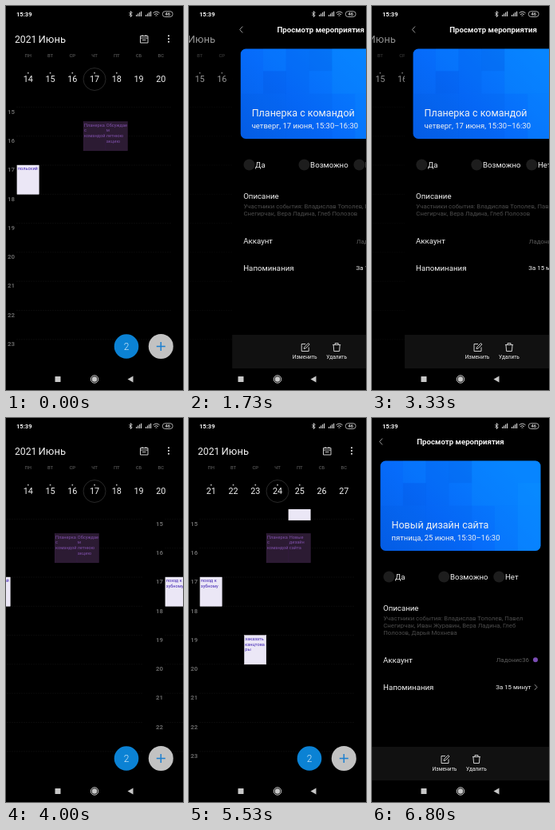
An HTML page for the animation above (7.67 s loop, 222 by 480 pixels).

```html
<!DOCTYPE html>
<html lang="ru">
<head>
<meta charset="utf-8">
<title>Календарь</title>
<style>
html, body { margin: 0; width: 100%; height: 100%; overflow: hidden; background: #000; }
svg { display: block; width: 222px; height: 480px; font-family: Roboto, "Noto Sans", sans-serif; fill: #f2f2f2; }
.mid { text-anchor: middle; }
.end { text-anchor: end; }
.line { fill: none; stroke: #e4e4e4; stroke-width: .9; }
.weekday { font-size: 5.9px; font-weight: 500; fill: #555; }
.date { font-size: 10.8px; }
.hour { font-size: 7.8px; font-weight: 700; fill: #666; }
.event { font-size: 5.6px; }
.label { font-size: 9.7px; }
.value { font-size: 7.9px; }
.note { font-size: 7.8px; fill: #4c4c4c; }
.tool { font-size: 6.6px; }
</style>
</head>
<body>
<svg viewBox="0 0 222 480">
  <defs>
    <linearGradient id="blue" x1="0" y1="1" x2="1" y2=".4">
      <stop offset="0" stop-color="#055fe6"/>
      <stop offset=".45" stop-color="#066bfa"/>
      <stop offset="1" stop-color="#0680ff"/>
    </linearGradient>
    <clipPath id="gridClip"><rect y="114" width="222" height="339"/></clipPath>
    <clipPath id="cardClip"><rect x="10.500" y="53.500" width="201" height="112.500" rx="6.500"/></clipPath>
  </defs>

  <g id="calendar">
    <g clip-path="url(#gridClip)"><g id="pages"></g></g>
    <text x="11" y="46" font-size="12.200">2021</text>
    <text x="40.500" y="46" font-size="13">Июнь</text>
    <path class="line" d="M168.500 37.500h9.500v8.500h-9.500zM168.500 40h9.500M171 36v2M175.500 36v2M171 42.500h4.500"/>
    <circle cx="204" cy="37.300" r="1"/><circle cx="204" cy="41" r="1"/><circle cx="204" cy="44.700" r="1"/>
    <g id="weekdays"></g>
    <g id="dates"></g>
    <circle cx="151" cy="425.500" r="15.300" fill="#0b82d4"/>
    <text class="mid" x="151" y="429.800" font-size="12" font-weight="300" fill="#d5ebfa">2</text>
    <circle cx="194.300" cy="425.500" r="15.500" fill="#c2c2c2"/>
    <path d="M188.800 425.500h11M194.300 420v11" stroke="#1b7fd0" stroke-width="1.500"/>
  </g>
  <rect id="dim" width="222" height="453" fill="#000"/>

  <g id="details"></g>

  <text x="13" y="12.700" font-size="7.600" font-weight="600">15:39</text>
  <path class="line" stroke-width=".7" d="M154.500 8.200l3.600 3.600-1.800 1.800v-7l1.800 1.800-3.600 3.600"/>
  <path d="M163 13h1.200v-2h-1.200zM165 13h1.200v-3.500h-1.200zM167 13h1.200v-5h-1.200zM169 13h1.200v-6.300h-1.200zM175 13h1.200v-2h-1.200zM177 13h1.200v-3.500h-1.200zM179 13h1.200v-5h-1.200zM181 13h1.200v-6.300h-1.200z" fill="#ccc"/>
  <path class="line" d="M184.500 8.800q4-3.400 8 0M186 10.600q2.500-2 5 0M187.600 12.300q.9-.8 1.800 0"/>
  <rect class="line" x="196.300" y="6.700" width="12.800" height="6.800" rx="3.200" style="stroke:#bbb"/>
  <text class="mid" x="202.700" y="12.200" font-size="5.800" font-weight="500">46</text>

  <rect y="453" width="222" height="27" fill="#000"/>
  <rect x="61.500" y="463" width="7" height="7" rx=".5" fill="#c8c8c8"/>
  <circle cx="111" cy="466.500" r="3.300" fill="#c8c8c8"/>
  <circle class="line" cx="111" cy="466.500" r="4.700" stroke="#c8c8c8"/>
  <path d="M159.500 462.500v8l-7-4z" fill="#c8c8c8"/>
</svg>

<script>
const $ = id => document.getElementById(id);
const LOOP = 7670, STEP = 200 / 3, WIDTH = 222;
const COL = 27.75, LEFT = 13.9, HOUR = 36.3;
const hourY = h => 126.4 + (h - 15) * HOUR;
const text = (cls, x, y, s, extra = '') => `<text class="${cls}" x="${x}" y="${y}" ${extra}>${s}</text>`;
const range = (n, f) => Array.from({ length: n }, (_, i) => f(i)).join('');
const dayX = i => LEFT + COL * (i + .5);

function event([day, from, to, title, past]) {
  const x = LEFT + day * COL, y = hourY(from);
  const [fill, ink, edge] = past ? ['#2c1b33', '#7f50aa', '#44264f'] : ['#ebe7f6', '#4023b4', '#f5f2fc'];
  const lines = title.split('|').map((s, i) => text('event', x + .9, y + 6.3 + i * 6.6, s, `fill="${ink}"`));
  return `<rect x="${x}" y="${y}" width="27.4" height="${hourY(to) - y}" fill="${fill}" stroke="${edge}" stroke-width=".4"/>${lines.join('')}`;
}

function page(offset, events) {
  const hours = range(9, i => {
    const y = hourY(15 + i);
    return `<path d="M13 ${y}H208" stroke="#0f0f0f" stroke-width=".7" stroke-dasharray="2 1"/>` +
      text('hour', 2, y + 8.2, 15 + i);
  });
  return `<g transform="translate(${offset})">${hours}${events.map(event).join('')}</g>`;
}

function week(offset, first) {
  const days = range(7, i => text('date mid', dayX(i), 95, first + i) +
    (i < 5 ? `<circle cx="${dayX(i)}" cy="83.7" r=".9" fill="#bbb"/>` : ''));
  return `<g transform="translate(${offset})"><circle cx="${dayX(3)}" cy="91.500" r="14" fill="#000" stroke="#3c3c3c" stroke-width=".7"/>${days}</g>`;
}

// Card tiles on a 7 by 4 grid: column, row, columns, rows, opacity
const tiles = [
  ['#0a90ff', [[4, 0, 3, 2, .3], [5, 2, 2, 2, .2], [6, 1, 1, 3, .35], [1, 0, 1, 1, .15]]],
  ['#0048c8', [[0, 2, 2, 2, .12], [1, 1, 1, 1, .15], [2, 0, 1, 2, .1], [3, 0, 1, 1, .14], [2, 2, 2, 2, .1]]]
];
const card = tiles.map(([c, list]) => list.map(([x, y, w, h, o]) =>
  `<rect x="${10 + x * 28.8}" y="${53 + y * 28.3}" width="${w * 28.8}" height="${h * 28.3}" fill="${c}" opacity="${o}"/>`).join('')).join('');

function detail(id, title, when, people) {
  const lower = 297 + (people.length - 2) * 8.7;
  const choices = ['Да', 'Возможно', 'Нет'].map((s, i) => {
    const x = 21.3 + i * 69;
    return `<circle cx="${x}" cy="198.500" r="7" fill="#1d1d1d"/>` + text('label', x + 7.6, 202, s);
  }).join('');
  return `<g id="${id}">
    <rect y="18" width="222" height="435" fill="#000"/>
    <path class="line" style="stroke:#aaa" d="M13 25.500l-3.500 4 3.500 4"/>
    ${text('mid', 111, 33, 'Просмотр мероприятия', 'font-size="9.700" font-weight="600"')}
    <g clip-path="url(#cardClip)"><rect x="10" y="53" width="202" height="114" fill="url(#blue)"/>${card}</g>
    ${text('', 24.5, 138, title, 'font-size="12.500"')}
    ${text('', 24.5, 153.3, when, 'font-size="9.500"')}
    ${choices}
    ${text('label', 14, 241, 'Описание')}
    ${people.map((s, i) => text('note', 14.3, 253.3 + i * 8.7, s)).join('')}
    ${text('label', 14, lower, 'Аккаунт')}
    ${text('value end', 197, lower - .5, 'Ладонис36', 'fill="#5c5c5c"')}
    <circle cx="205" cy="${lower - 3.5}" r="3" fill="#7b4db5"/>
    ${text('label', 14, lower + 34.3, 'Напоминания')}
    ${text('value end', 199.5, lower + 33.3, 'За 15 минут')}
    <path class="line" style="stroke:#aaa" d="M204 ${lower + 27.5}l3 3.300-3 3.300"/>
    <rect y="411" width="222" height="42" fill="#111"/>
    <path class="line" d="M92 422.500h-5v9h9v-5M90 428.500l.5-2 5-5 1.500 1.500-5 5z"/>
    <path class="line" d="M126 423.500h10M129 423v-1.500h4v1.500M127 424l.6 7.500h6.800l.6-7.500"/>
    ${text('tool mid', 91, 441, 'Изменить')}
    ${text('tool mid', 131, 441, 'Удалить')}
  </g>`;
}

$('pages').innerHTML = page(0, [
  [0, 17, 18, 'польский'],
  [3, 15.5, 16.5, 'Планерка|с|командой', true],
  [4, 15.5, 16.5, 'Обсуждае|м|летнюю|акцию', true]
]) + page(WIDTH, [
  [0, 17, 18, 'поход к|зубному'],
  [2, 19, 20, 'заказать|канцтова|ры'],
  [3, 15.5, 16.5, 'Планерка|с|командой', true],
  [4, 15.5, 16.5, 'Новые|дизайн|сайта', true],
  [4, 14, 15.04, '']
]);
$('weekdays').innerHTML = ['ПН', 'ВТ', 'СР', 'ЧТ', 'ПТ', 'СБ', 'ВС']
  .map((s, i) => text('weekday mid', dayX(i), 64.3, s)).join('');
$('dates').innerHTML = week(0, 14) + week(WIDTH, 21);
const firstLine = 'Участники события: Владислав Тополев, Павел';
$('details').innerHTML =
  detail('meeting', 'Планерка с командой', 'четверг, 17 июня, 15:30–16:30',
    [firstLine, 'Снегирчак, Вера Ладина, Глеб Полозов']) +
  detail('design', 'Новый дизайн сайта', 'пятница, 25 июня, 15:30–16:30',
    [firstLine, 'Снегирчак, Иван Журавин, Вера Ладина, Глеб', 'Полозов, Дарья Мохнева']);

const clamp = v => Math.min(1, Math.max(0, v));

// Critically damped slide lasting 600 ms
function slide(t, start) {
  const rise = x => 1 - (1 + x) * Math.exp(-x);
  return rise(6 * clamp((t - start) / 600)) / rise(6);
}
const left = (t, start, span) => (1 - clamp((t - start) / span)) ** 5;

// Finger drag, then a long settling fling
function swipe(t) {
  const drag = 36 * (Math.max(0, Math.min(t, 4067) - 3900) / 100) ** 1.5;
  return t < 4067 ? drag : WIDTH - (WIDTH - drag) * left(t, 4067, 1336);
}

const move = (id, x) => $(id).setAttribute('transform', `translate(${x.toFixed(2)})`);

function show(id, p) {
  $(id).style.display = p > 0 ? '' : 'none';
  move(id, WIDTH * (1 - p));
}

function draw(now) {
  const t = Math.floor((now % LOOP + 5) / STEP) * STEP;
  const first = slide(t, 1468) - slide(t, 3256);
  const second = slide(t, 5830);
  const open = first + second;
  show('meeting', first);
  show('design', second);
  move('calendar', -WIDTH / 4 * open);
  $('dim').setAttribute('opacity', .5 * open);
  move('pages', -swipe(t));
  move('dates', -WIDTH * (1 - left(t, 4130, 1290)));
}

const began = performance.now();
function tick() {
  draw(performance.now() - began);
  requestAnimationFrame(tick);
}
tick();
</script>
</body>
</html>
```
